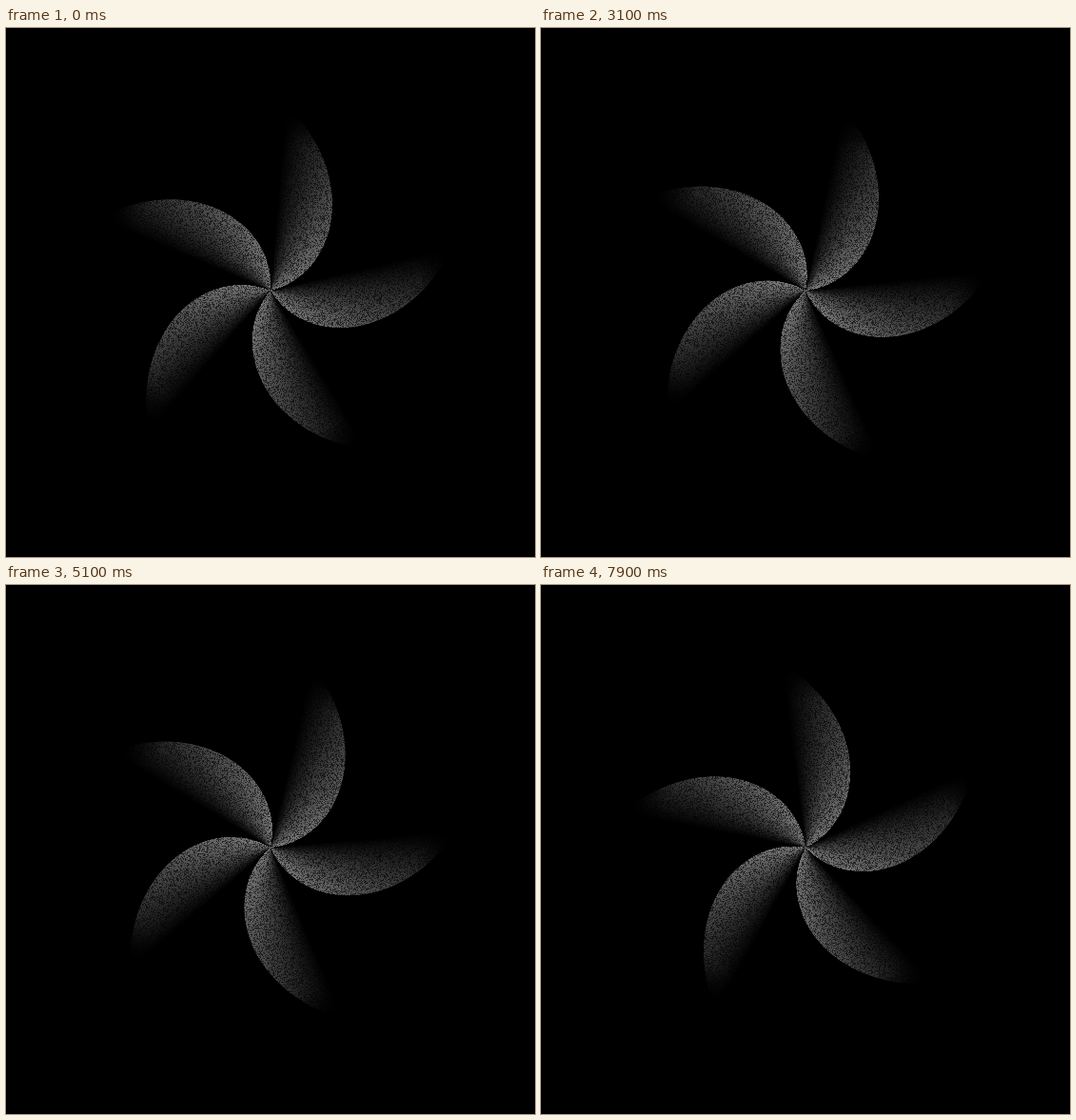
Recreate the animation shown at these times as an HTML page with a canvas. Size 556 px wide and 556 px high, loop 8 s.

```html
<!DOCTYPE html>
<html lang="en">
<head>
<meta charset="utf-8">
<title>Pinwheel</title>
<style>
  html, body { margin: 0; width: 100%; height: 100%; overflow: hidden; background: #000; }
  canvas { display: block; width: 556px; height: 556px; }
</style>
</head>
<body>
<canvas id="stage" width="556" height="556"></canvas>
<script>
const SIZE = 556, CX = 278, CY = 276;
const LOOP = 8000, TICK = 100;
const SECTOR = 72;      // five blades
const REACH = 196;      // radius where a blade closes
const RIM = 187, FADE = 32;
const START = 13.4;     // angle of the first blade's root
const LIGHT = 92;

// [step, clockwise degrees turned]
const TURN = [[0, 0], [8, 75.2], [16, 148.8], [25, 223.3],
              [35, 312.2], [47, 424.4], [63, 564], [64, 576]];

const ctx = document.getElementById('stage').getContext('2d');
const image = ctx.createImageData(SIZE, SIZE);
const pixels = new Uint32Array(image.data.buffer);
pixels.fill(0xff000000);

const clamp = v => Math.min(1, Math.max(0, v));

let seed = 7;
function random() {
  seed = (Math.imul(seed, 1664525) + 1013904223) >>> 0;
  return seed / 4294967296;
}

// Polar coordinates and light for every pixel inside the wheel
const spots = [];
for (let y = 0; y < SIZE; y++) {
  for (let x = 0; x < SIZE; x++) {
    const dx = x + 0.5 - CX, dy = CY - y - 0.5;
    const radius = Math.hypot(dx, dy);
    if (radius > RIM) continue;
    const grain = random() < 0.65 ? 1.1 + 0.3 * random() : 0.4 + 0.3 * random();
    const angle = Math.atan2(dy, dx) * 180 / Math.PI;
    const light = LIGHT * grain * clamp((RIM - radius) / FADE);
    spots.push({ at: y * SIZE + x, radius, angle, light });
  }
}

function turnAt(step) {
  let i = 1;
  while (TURN[i][0] < step) i++;
  const [s0, a0] = TURN[i - 1], [s1, a1] = TURN[i];
  return a0 + (a1 - a0) * (step - s0) / (s1 - s0);
}

function draw(step) {
  const base = START - turnAt(step);
  for (const p of spots) {
    const turns = (p.angle - base) / SECTOR;
    const u = turns - Math.floor(turns);
    // The bright edge is a spiral; light falls off towards a radial line
    const cover = clamp(u * REACH - p.radius + 0.5);
    const v = Math.round(p.light * (1 - u * u) * cover);
    pixels[p.at] = 0xff000000 | v << 16 | v << 8 | v;
  }
  ctx.putImageData(image, 0, 0);
}

// Sixty-four steps spread over eighty ticks
function stepAt(ms) {
  const tick = Math.floor((ms % LOOP) / TICK);
  return tick - Math.floor((tick + 3) / 5);
}

let shown = -1;
function update(ms) {
  const step = stepAt(ms);
  if (step !== shown) draw(shown = step);
}

const began = performance.now();
function loop() {
  update(performance.now() - began);
  requestAnimationFrame(loop);
}
loop();
</script>
</body>
</html>
```
